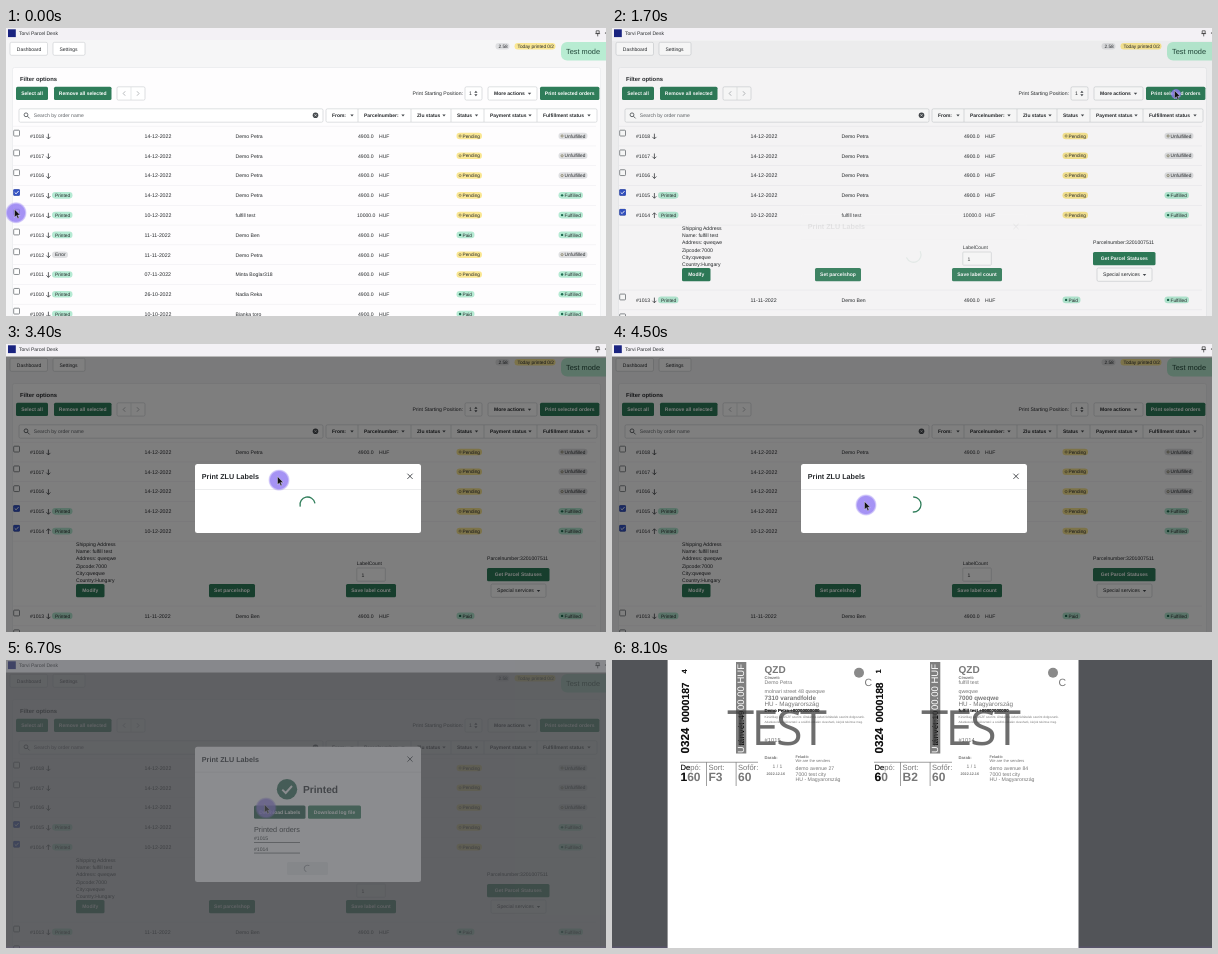
An HTML page for the animation above (8.8 s loop, 600 by 288 pixels).

```html
<!DOCTYPE html>
<html lang="en">
<head>
<meta charset="utf-8">
<title>Label printing</title>
<style>
html, body { margin: 0; width: 100%; height: 100%; overflow: hidden; background: #f6f6f7; }
svg { display: block; width: 100%; height: 100%; }
text { font-family: "Liberation Sans", Arial, sans-serif; text-rendering: geometricPrecision; white-space: pre; }
.stamp { font-family: "Open Sans", sans-serif; letter-spacing: -2.6px; }
</style>
</head>
<body>
<svg id="stage" viewBox="0 0 600 288" fill="#26292c" xmlns="http://www.w3.org/2000/svg"></svg>
<script>
const GREEN = '#2f7d5a', MINT = '#b5ead3', YELLOW = '#fae793', GRAY = '#dfe0e2';
const BORDER = '#c8cbce', LINE = '#ebebee';
const LOOP = 8800, FRAME = 100, ROW_STEP = 19.78, FIRST_ROW = 108, DETAIL_HEIGHT = 65;

// Markup helpers
const text = (x, y, value, size = 5.1, attrs = '') =>
  `<text x="${x}" y="${y}" font-size="${size}" ${attrs}>${value}</text>`;
const bold = (x, y, value, size = 5, attrs = '') => text(x, y, value, size, 'font-weight="700" ' + attrs);
const rect = (x, y, w, h, fill, attrs = '') =>
  `<rect x="${x}" y="${y}" width="${w}" height="${h}" fill="${fill}" ${attrs}/>`;
const path = (d, stroke = '#4a4e52', width = .8, attrs = '') =>
  `<path d="${d}" fill="none" stroke="${stroke}" stroke-width="${width}" ${attrs}/>`;
const circle = (x, y, r, fill, attrs = '') => `<circle cx="${x}" cy="${y}" r="${r}" fill="${fill}" ${attrs}/>`;
const group = (id, content, attrs = '') => `<g id="${id}" ${attrs}>${content}</g>`;
const caret = (x, y) => `<path d="M${x - 1.7} ${y - .8}h3.4l-1.7 2z" fill="#44484c"/>`;
const frame = (x, y, w, h, r = 1.5) => rect(x, y, w, h, '#fff', `rx="${r}" stroke="${BORDER}" stroke-width=".6"`);
const divider = y => rect(7, y, 583, .5, LINE);
const button = (x, y, w, label, fill = GREEN) =>
  rect(x, y, w, 13.2, fill, 'rx="1.5"') +
  bold(x + w / 2, y + 8.4, label, 5, 'text-anchor="middle" fill="#fff"');
const pill = (x, y, w, label, fill, dot) => {
  const mark = dot === 'full' ? circle(x + 3.6, y, 1.2, '#1f6b50')
    : dot === 'ring' ? circle(x + 3.6, y, 1.1, 'none', 'stroke="#6b6340" stroke-width=".6"') : '';
  return rect(x, y - 3.3, w, 6.6, fill, 'rx="3.3"') + mark + text(x + (dot ? 6 : 3), y + 1.7, label, 4.75);
};

function statusPill(x, y, status) {
  const [width, color, dot] = {
    Pending: [25.5, YELLOW, 'ring'], Paid: [18, MINT, 'full'],
    Unfulfilled: [29, GRAY, 'ring'], Fulfilled: [24.5, MINT, 'full']
  }[status];
  return pill(x, y, width, status, color, dot);
}

const checkbox = y => rect(7.7, y - 5.8, 5.8, 5.8, '#fff', 'rx=".8" stroke="#6d7175" stroke-width=".8"');
const checkedBox = y => rect(7.3, y - 6.2, 6.6, 6.6, '#3452c4', 'rx="1"') +
  path(`M8.7 ${y - 2.9}l1.4 1.4 2.5-2.8`, '#fff', .9);

function row([order, badge, date, name, amount, payment, fulfillment], index) {
  const y = FIRST_ROW + ROW_STEP * index, opened = order === 1014;
  return checkbox(y) + (order === 1015 ? checkedBox(y) : '') +
    (opened ? group('check', checkedBox(y)) : '') +
    text(24, y + 1.9, '#' + order) +
    path('M0-2.6V2.6M-2 .6L0 2.6 2 .6', '#3a3e42', .8,
      `${opened ? 'id="arrow"' : ''} transform="translate(42.4 ${y + .3})" data-y="${y + .3}"`) +
    (badge ? pill(46, y, badge === 'Error' ? 16 : 20.5, badge, badge === 'Error' ? GRAY : MINT) : '') +
    text(138.5, y + 1.9, date, 5.25) + text(229.5, y + 1.9, name) +
    text(opened ? 351 : 352, y + 1.9, amount) + text(373, y + 1.9, 'HUF') +
    statusPill(450.5, y, payment) + statusPill(552.5, y, fulfillment) + divider(y + 9.7);
}

const rows = [
  [1018, '', '14-12-2022', 'Demo Petra', '4900.0', 'Pending', 'Unfulfilled'],
  [1017, '', '14-12-2022', 'Demo Petra', '4900.0', 'Pending', 'Unfulfilled'],
  [1016, '', '14-12-2022', 'Demo Petra', '4900.0', 'Pending', 'Unfulfilled'],
  [1015, 'Printed', '14-12-2022', 'Demo Petra', '4900.0', 'Pending', 'Fulfilled'],
  [1014, 'Printed', '10-12-2022', 'fulfill test', '10000.0', 'Pending', 'Fulfilled'],
  [1013, 'Printed', '11-11-2022', 'Demo Ben', '4900.0', 'Paid', 'Fulfilled'],
  [1012, 'Error', '11-11-2022', 'Demo Petra', '4900.0', 'Pending', 'Unfulfilled'],
  [1011, 'Printed', '07-11-2022', 'Minta Boglar318', '4900.0', 'Pending', 'Fulfilled'],
  [1010, 'Printed', '26-10-2022', 'Nadia Reka', '4900.0', 'Paid', 'Fulfilled'],
  [1009, 'Printed', '10-10-2022', 'Bianka toro', '4900.0', 'Paid', 'Fulfilled']
].map(row);

const header = rect(0, 0, 600, 12, '#f3f1f5') + rect(2, 1.3, 7.8, 7.8, '#1a2380') +
  text(13, 7.3, 'Torvi Parcel Desk', 5) +
  path('M590.2 2.8h3v2.6h-3zM589.3 5.6h4.8M591.7 5.6v2.8', '#333', .7) + circle(599.5, 5, .6, '#333');

const filters = [[320, 'From:', 346], [352, 'Parcelnumber:', 397], [405, 'Zlu status', 438],
  [445, 'Status', 470.5], [478, 'Payment status', 524], [531, 'Fulfillment status', 583]];

const toolbar = frame(4, 14.3, 37.5, 13) + text(10.8, 22.6, 'Dashboard', 5) +
  frame(47, 14.3, 32, 13) + text(53.5, 22.6, 'Settings', 5) +
  pill(489.5, 18.2, 14, '2.58', GRAY) + pill(508.5, 18.2, 41, 'Today printed 0/2', YELLOW) +
  rect(555, 14, 50, 18.5, '#b8ecd2', 'rx="6"') + text(560, 26, 'Test mode', 7.4, 'fill="#23493b"') +
  rect(6.5, 39.5, 588, 260, '#fefdfe', 'rx="2" stroke="#e9eaec" stroke-width=".7"') +
  bold(14, 53.3, 'Filter options', 5.85) +
  button(10, 58.8, 32, 'Select all') + button(48, 58.8, 57.5, 'Remove all selected') +
  frame(111, 58.8, 28, 13.3) + path('M125 59v13', '#d5d8da', .6) +
  path('M119.2 63.3l-2 2.2 2 2.2M131 63.3l2 2.2-2 2.2', '#a5a9ad') +
  text(406.5, 67.4, 'Print Starting Position:') +
  frame(459, 58.8, 17, 13.3) + text(463, 67.4, '1') +
  `<path d="M468.3 64.8l1.6-2 1.6 2zM468.3 66.2l1.6 2 1.6-2z" fill="#44484c"/>` +
  frame(482, 58.8, 49, 13.3) + bold(488, 67.3, 'More actions') + caret(523.5, 65.5) +
  button(534, 58.8, 59.4, 'Print selected orders') +
  frame(13, 80.8, 304, 13.4) + circle(20, 86.8, 1.9, 'none', 'stroke="#4a4e52" stroke-width=".8"') +
  path('M21.4 88.2l2.2 2.2') + text(27.8, 89.1, 'Search by order name', 5.05, 'fill="#62666a"') +
  circle(309.5, 87.3, 2.8, '#44484c') + path('M308.4 86.2l2.2 2.2m0-2.2l-2.2 2.2', '#fff', .6) +
  frame(320, 80.8, 271, 13.4) +
  filters.map(([x, label, mark], i) => (i ? path(`M${x} 81v13`, BORDER, .6) : '') +
    bold(x + 6, 89.1, label, 4.95) + caret(mark, 87.2)).join('') +
  divider(97.9);

const address = ['Shipping Address', 'Name: fulfill test', 'Address: qweqwe', 'Zipcode:7000', 'City:qweqwe', 'Country:Hungary'];
const detail = address.map((line, i) => text(70, 201.7 + 7.35 * i, line)).join('') +
  button(70, 240, 28.5, 'Modify') + button(203, 240, 46, 'Set parcelshop') +
  text(350.8, 220.6, 'LabelCount', 4.9) + frame(350.8, 224, 28.5, 13.2, .8) + text(355.5, 232.5, '1') +
  button(340, 240, 50, 'Save label count') + text(481, 216.4, 'Parcelnumber:3201007511') +
  button(481, 224, 62.5, 'Get Parcel Statuses') +
  frame(485, 240, 55, 13.3) + text(491, 248.4, 'Special services') + caret(532.5, 246.7) +
  divider(261.8);

// Dialog
const dialogBox = (y, h) => rect(189, y, 226, h, '#fff', 'rx="2.5"') +
  bold(195.8, y + 14.7, 'Print ZLU Labels', 7.2) +
  path(`M401.4 ${y + 9.7}l5.2 5.2m0-5.2l-5.2 5.2`, '#3a3e42', .9) +
  rect(189, y + 25, 226, .6, '#dfe1e3');
const spinner = (id, x, y, r, color, width) => group(id,
  path(`M${r} 0A${r} ${r} 0 0 1 ${-r} 0`, color, width, 'stroke-linecap="round"'), `data-x="${x}" data-y="${y}"`);
const loading = dialogBox(120, 69) + spinner('bigSpinner', 301.5, 160.5, 7.5, GREEN, 1.3);
const finished = dialogBox(86.8, 135.2) + circle(281, 129.3, 10.2, '#2b6d55') +
  path('M276.3 129.6l3.4 3.4 6.3-7', '#fff', 1.9) + bold(297, 133, 'Printed', 10.2) +
  button(248, 145.6, 51.5, 'Download Labels', '#1e5a45') + button(302, 145.6, 53, 'Download log file') +
  text(248, 172.4, 'Printed orders', 7.3) +
  text(248, 180.4, '#1015') + rect(248, 182, 46, .7, '#45494d') +
  text(248, 191.2, '#1014') + rect(248, 192.7, 46, .7, '#45494d') +
  rect(281, 202, 41, 13, '#eeeff0', 'rx="1.5"') + spinner('smallSpinner', 301.5, 208.5, 3.3, '#8c9196', .9);

// Printed parcel labels
const upward = (x, y, value, size, fill, weight = 400) => text(0, 0, value, size,
  `fill="${fill}" font-weight="${weight}" transform="translate(${x} ${y}) rotate(-90)"`);

function parcelLabel(dx, data) {
  const ink = 'fill="#777"', dark = 'fill="#111"';
  const code = color => upward(77.2, 93.5, '0324', 11.6, color, 700) +
    upward(77.2, 62.5, data.code, 10.3, color, 700) + upward(75.4, 13.5, data.digit, 7.5, color, 700);
  const contact = style => bold(152.5, 52, data.name + ' +00000000000', 4.4, style);
  const amount = color => upward(131.6, 85.8, data.amount, 8, color, 700);
  const base = code('#777') + rect(124, 2, 10.3, 91.5, '#808080') +
    upward(132.3, 93, 'U', 9, '#fff') + amount('#eee') + upward(132.3, 50, '00.00 HUF', 9.5, '#fff') +
    bold(152.5, 13.3, 'QZD', 10, ink) + bold(152.5, 18.5, 'Címzett:', 4, ink) +
    text(152.5, 24.2, data.name, 5.2, ink) + text(152.5, 33, data.street, 5.3, ink) +
    bold(152.5, 39.8, data.city, 6.3, ink) + text(152.5, 46.2, 'HU - Magyarország', 6.3, ink) + contact(ink) +
    text(152.5, 58.3, 'Kizárólag az ÁSZF szerint. Általános üzleti feltételek szerint dolgozunk.', 3.2, ink) +
    text(152.5, 63.2, 'Adatkezelési tájékoztató: a szállító oldalán olvasható, kérjük tekintse meg.', 3, ink) +
    text(152.5, 82, data.order, 5.8, ink) + circle(247, 12.8, 5, '#8a8a8a') + text(252.5, 26, 'C', 10.5, ink) +
    bold(152.5, 99, 'Darab:', 4.2, ink) + text(160.5, 107.6, '1 / 1', 5, ink) +
    bold(154.5, 115.3, '2022.12.16', 3.7, ink) + bold(183.5, 98, 'Feladó:', 3.8, ink) +
    text(183.5, 102, 'We are the senders', 4, ink) + text(183.5, 110.4, data.sender, 5.2, ink) +
    text(183.5, 115.9, '7000 test city', 5.2, ink) + text(183.5, 121.2, 'HU - Magyarország', 5.2, ink) +
    rect(68, 101.8, 78, .8, '#888') + rect(94, 102, .8, 24, '#888') + rect(123.7, 102, .8, 24, '#888') +
    text(68.5, 110, 'Depó:', 7.6, ink) + text(96.5, 110, 'Sort:', 7.6, ink) + text(126, 110, 'Sofőr:', 7.6, ink) +
    bold(68.5, 121.3, data.depot, 12, ink) + bold(96.5, 121.3, data.sort, 12, ink) + bold(126, 121.3, '60', 12, ink);
  const sharp = code('#111') + amount('#000') + contact(dark) +
    text(68.5, 110, 'De', 7.6, dark) + bold(68.5, 121.3, data.depot[0], 12, dark);
  const stamp = text(115.3, 85.3, 'TEST', 48.5, 'class="stamp" fill="#3c3c3c" fill-opacity=".75"');
  return `<g transform="translate(${dx} 0)">${base}<g class="sharp">${sharp}</g>${stamp}</g>`;
}

const labels = parcelLabel(0, {
  code: '0000187', digit: '4', amount: 'tánvét:49', name: 'Demo Petra', street: 'molnari street 48 qweqwe',
  city: '7310 varandfolde', order: '#1015', sender: 'demo avenue 27', depot: '160', sort: 'F3'
}) + parcelLabel(194, {
  code: '0000188', digit: '1', amount: 'tánvét:10', name: 'fulfill test', street: 'qweqwe',
  city: '7000 qweqwe', order: '#1014', sender: 'demo avenue 84', depot: '60', sort: 'B2'
});

document.getElementById('stage').innerHTML =
  `<defs><radialGradient id="glow"><stop offset=".8" stop-color="#8f78f2" stop-opacity=".8"/>
   <stop offset="1" stop-color="#8f78f2" stop-opacity=".15"/></radialGradient></defs>` +
  rect(0, 0, 600, 288, '#f6f6f7') + toolbar + rows.slice(0, 5).join('') +
  group('detail', detail) + group('lowerRows', rows.slice(5).join('')) +
  header + group('shade', rect(0, 12.5, 600, 276, '#000', 'fill-opacity=".5"')) +
  group('loading', loading) + group('finished', finished) +
  group('pointer', circle(0, 0, 10.5, 'url(#glow)', 'id="halo"') +
    '<path d="M-1.5-3.5v8l1.9-1.7 1.3 2.9 1.3-.6-1.3-2.8h2.5z" fill="#111" stroke="#fff" stroke-width=".35"/>') +
  group('viewer', rect(0, 0, 600, 288, '#525458') + rect(0, 286.5, 600, 1.5, '#58546a') +
    group('page', rect(55.6, 0, 410.9, 288, '#fff') + labels));

// Motion
const el = id => document.getElementById(id);
const clamp = v => Math.max(0, Math.min(1, v));
const fade = (node, amount) => node.setAttribute('opacity', amount);
const move = (id, value) => el(id).setAttribute('transform', value);

const route = [[0, 10, 184.8], [200, 10, 184.8], [450, 42, 187], [600, 42, 187], [900, 300, 110],
  [1500, 562, 66], [1700, 564, 66], [1800, 564, 66], [2200, 329.5, 122], [2700, 294, 109], [3600, 270, 140],
  [4100, 254, 161], [4700, 254, 161], [5300, 260, 148], [8800, 260, 148]];
const clicks = [200, 550, 1700, 5900];

function pointerAt(t) {
  const i = route.findIndex(point => point[0] > t);
  const [t0, x0, y0] = route[i - 1], [t1, x1, y1] = route[i];
  const p = (t - t0) / (t1 - t0), eased = p * p * (3 - 2 * p);
  return [x0 + (x1 - x0) * eased, y0 + (y1 - y0) * eased];
}

function draw(t) {
  const expanded = t >= 600, done = t >= 5000, opening = clamp((t - 1684) / 200);
  fade(el('check'), t >= 200 ? 1 : 0);
  fade(el('detail'), expanded ? 1 : 0);
  move('lowerRows', `translate(0 ${expanded ? DETAIL_HEIGHT : 0})`);
  move('arrow', `translate(42.4 ${el('arrow').dataset.y}) rotate(${expanded ? 180 : 0})`);
  fade(el('shade'), opening);
  fade(el('loading'), done ? 0 : opening);
  fade(el('finished'), done ? 1 : 0);
  move('loading', `translate(0 ${72 * (1 - opening)})`);

  const angle = (t - 2200) / 481 * 360 - 10;
  for (const id of ['bigSpinner', 'smallSpinner']) {
    const { x, y } = el(id).dataset;
    move(id, `translate(${x} ${y}) rotate(${angle})`);
  }

  const press = Math.max(...clicks.map(c => clamp(1 - Math.abs(t - c) / 150)));
  move('pointer', `translate(${pointerAt(t).join(' ')})`);
  el('halo').setAttribute('r', 10.7 - 5.4 * press);

  fade(el('viewer'), clamp((t - 6300) / 600));
  fade(el('page'), clamp((t - 7000) / 600));
  document.querySelectorAll('.sharp').forEach(node => fade(node, clamp((t - 7900) / 200)));
}

// The picture advances in steps of FRAME; the small lead absorbs timer rounding.
const start = performance.now();
function tick() {
  const elapsed = (performance.now() - start + 5) % LOOP;
  draw(Math.floor(elapsed / FRAME) * FRAME);
  requestAnimationFrame(tick);
}
tick();
</script>
</body>
</html>
```
